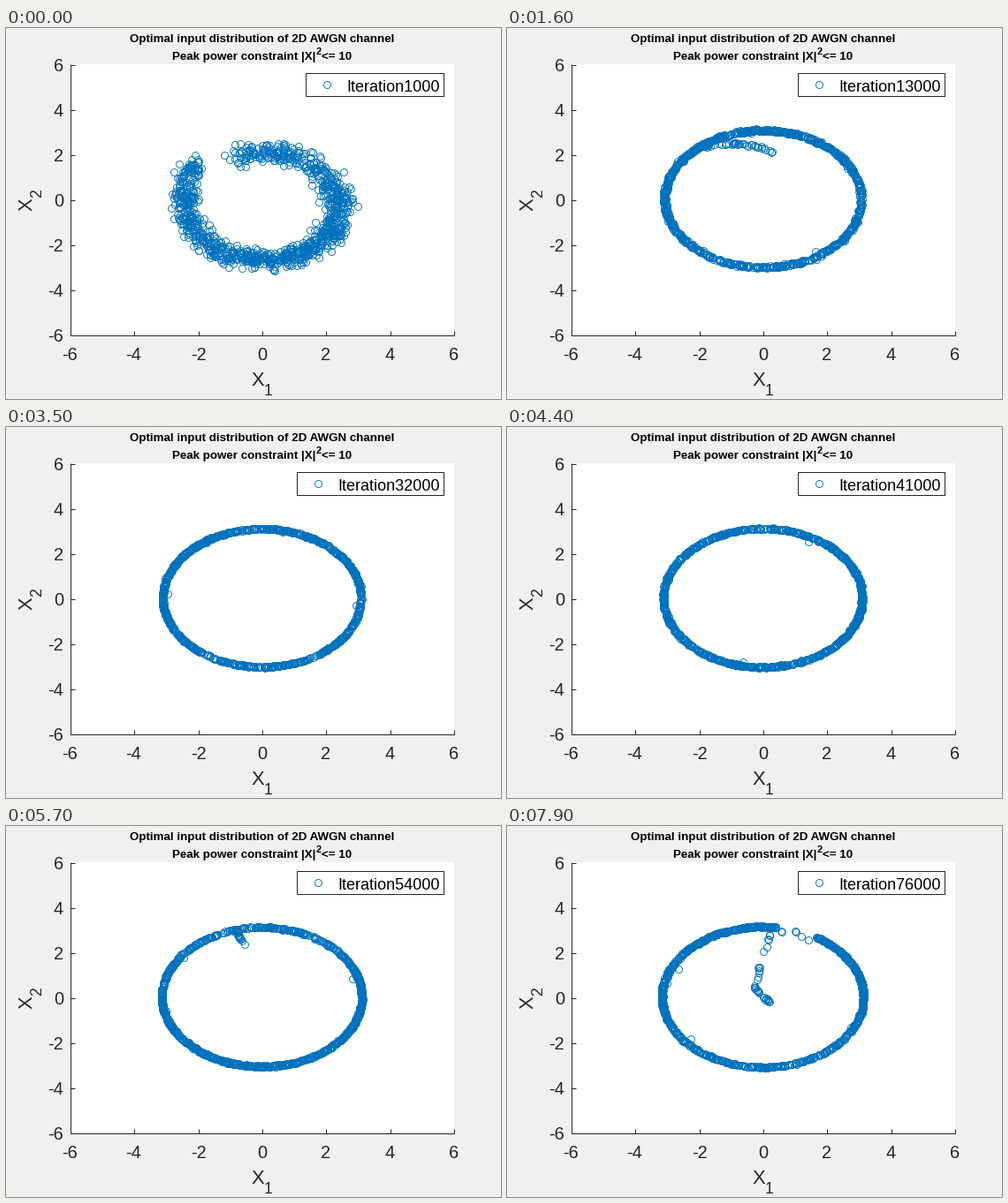
These frames come from a looping animation (560 by 420 pixels, 8000 ms). A matplotlib script:

```python
import numpy as np
import matplotlib.pyplot as plt
from matplotlib.animation import FuncAnimation
from matplotlib.patches import Rectangle

W, H, DPI = 560, 420, 100
PX = 72 / DPI
INK, BLUE = "#262626", "#0072BD"
LEFT, RIGHT, TOP, BOTTOM = 72.5, 506.5, 41, 347.5
N = 1000


def to_px(x, y):
    return (LEFT + (x + 6) * (RIGHT - LEFT) / 12,
            BOTTOM - (y + 6) * (BOTTOM - TOP) / 12)


def ramp(k, a, b):
    return np.clip((k - a) / (b - a), 0, 1)


def ellipse(k, grow, deg):
    """Points at the given angles on the slowly growing outline."""
    th = np.radians(deg)
    x = (2.4 + 0.66 * grow + 0.0012 * k) * np.cos(th)
    y = (2.4 + 0.62 * grow + 0.0012 * k) * np.sin(th) - 0.3 + 0.33 * grow
    return np.column_stack([x, y])


def chord(u, out, back):
    """Strand from the seam through a dense hub to a free end."""
    seam = np.array([-0.9 + 1.15 * out, 2.95])
    hub = np.array([-0.28 * back, 0.2 + 0.25 * back])
    end = np.array([1.48 - 1.28 * back, -3.07 + 2.87 * back])
    v = 2 * u[:, None] - 1
    arm = np.where(v < 0, seam, end)
    path = hub + (arm - hub) * np.abs(v) ** 1.4
    return seam + out * (path - seam)


def cloud(k):
    """Sample cloud after k thousand iterations."""
    rng = np.random.default_rng(100 + k)
    grow = 1 - np.exp(-(k - 1) / 2.3)
    hook = grow * max(0, 1 - abs(k - 13) / 9)
    out, back = ramp(k, 53, 63), ramp(k, 63, 76)
    n_hook, n_chord = int(45 * hook), int(130 * out - 95 * back)

    # Main sweep, clockwise from the seam.
    start = 116 - 48 * out - 10 * back
    sweep = 325 + 35 * grow - 10 * out - 14 * back
    u = rng.random(N - n_hook - n_chord)
    u += 0.25 * (1 - grow) * u * (1 - u)
    u += 0.04 * np.sin(2 * np.pi * u) * np.sin(1.3 * k)
    body = ellipse(k, grow, start - sweep * u)
    body[:, 1] += 0.8 * (1 - grow) * np.clip(u, 0, 1) ** 8

    # Overlapping end that bends inward past the seam.
    u = rng.random(n_hook)
    tail = ellipse(k, grow, 133 - 51 * hook * u) * (1 - 0.3 * hook * u[:, None])

    strand = chord(rng.random(n_chord), out, back)
    pts = np.vstack([body, tail, strand])
    pts += rng.normal(0, 0.018 + 0.2 * np.exp(-(k - 1) / 4), pts.shape)

    # A few stragglers just inside the outline and in the gap.
    deg = np.append(rng.uniform(0, 360, 2),
                    rng.uniform(start, start + 360 - sweep, int(6 * out)))
    stray = ellipse(k, grow, deg) * rng.uniform(0.92, 1, (len(deg), 1))
    return np.vstack([pts, stray])


fig = plt.figure(figsize=(W / DPI, H / DPI), dpi=DPI, facecolor="#f0f0f0")
ax = fig.add_axes([0, 0, 1, 1])
ax.set_xlim(0, W)
ax.set_ylim(H, 0)
ax.axis("off")
ax.add_patch(Rectangle((73, 41), 434, 307, fc="white", lw=0))


def text(x, y, s, size, color=INK, **kw):
    return ax.text(x, y, s, fontsize=size * PX, color=color,
                   family="Liberation Sans", va="baseline", **kw)


def line(xs, ys):
    ax.plot(xs, ys, color=INK, lw=PX, solid_capstyle="butt", zorder=3)


line([LEFT, LEFT], [TOP, BOTTOM + 0.5])
line([LEFT, RIGHT + 0.5], [BOTTOM, BOTTOM])
for v in range(-6, 7, 2):
    x, y = (np.floor(p) + 0.5 for p in to_px(v, v))
    line([x, x], [BOTTOM - 4.5, BOTTOM])
    line([LEFT, LEFT + 5], [y, y])
    text(x, 376, str(v), 20, ha="center")
    text(65, y + 7.5, str(v), 20, ha="right")

bold = dict(color="black", weight="bold")
text(290, 16, "Optimal input distribution of 2D AWGN channel", 13.33, ha="center", **bold)
text(188, 36, "Peak power constraint |X|", 13.33, **bold)
text(351, 30, "2", 11, **bold)
text(357, 36, "<= 10", 13.33, **bold)
text(277, 405, "X", 22)
text(292, 416, "1", 17.6)
turned = dict(rotation=90, rotation_mode="anchor", ha="left")
text(29, 207, "X", 22, **turned)
text(40, 192, "2", 17.6, **turned)

circles = dict(ls="none", marker="o", ms=8 * PX, mfc="none", mec=BLUE, mew=0.9 * PX)
dots, = ax.plot([], [], zorder=4, **circles)
box = ax.add_patch(Rectangle((338.5, 50.5), 156, 26, fc="white", ec=INK, lw=PX, zorder=5))
key, = ax.plot([], [], zorder=6, **circles)
label = text(491, 72, "", 18, color="black", ha="right", zorder=6)


def draw(i):
    k = max(1, i - 3)
    dots.set_data(*to_px(*cloud(k).T))
    left = 338.5 if k < 10 else 328.5
    box.set_x(left)
    box.set_width(494.5 - left)
    key.set_data([left + 24.5], [64])
    label.set_text(f"Iteration{k * 1000}")
    return dots, box, key, label


anim = FuncAnimation(fig, draw, frames=80, interval=100, repeat=True, repeat_delay=0)
plt.show()
```
